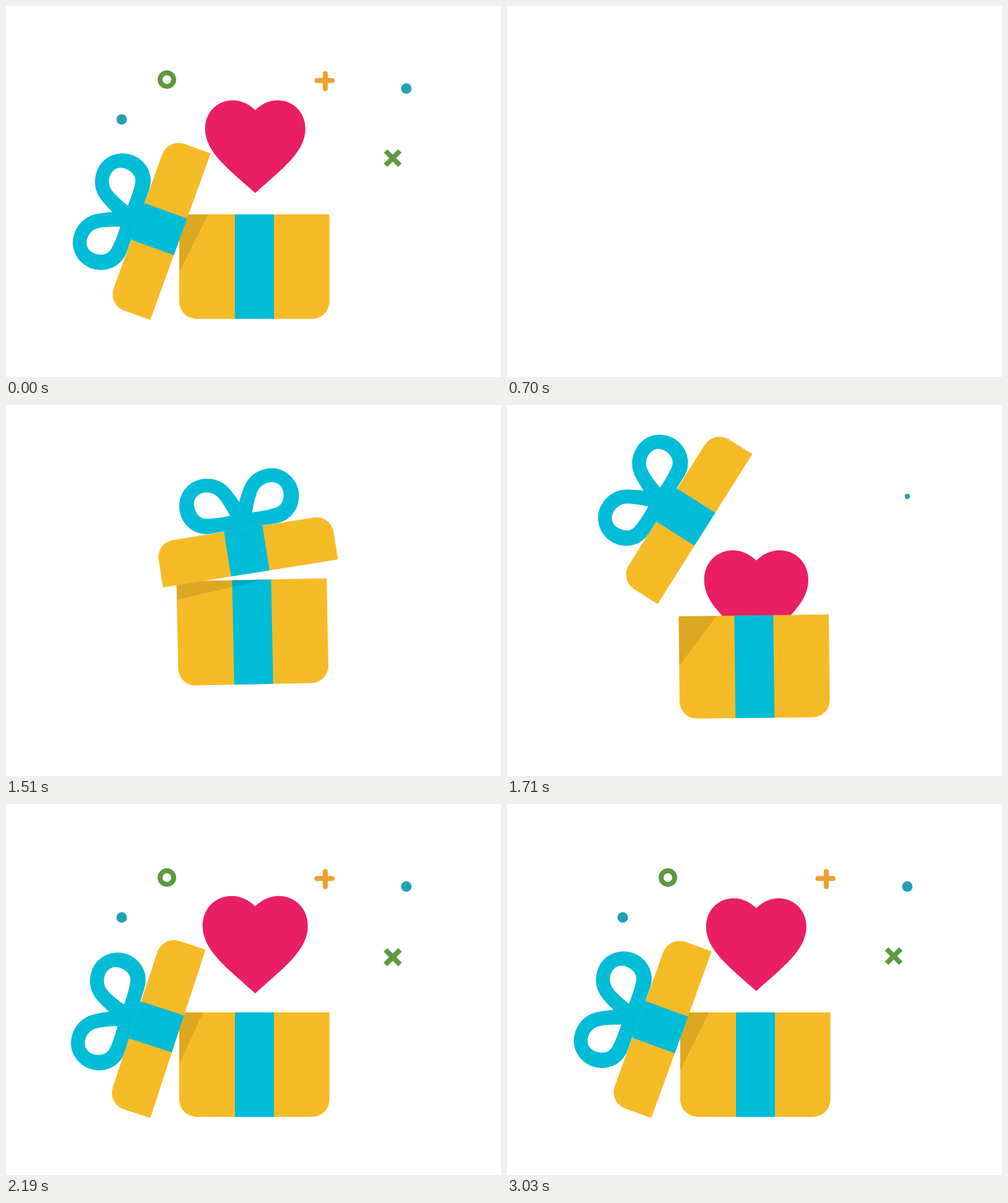
Write an HTML page with a canvas that moves like this. It is 800 px wide and 600 px high and loops after 3630 ms.

```html
<!DOCTYPE html>
<html lang="en">
<head>
<meta charset="utf-8">
<title>Gift box</title>
<style>
  html, body { margin: 0; width: 100%; height: 100%; overflow: hidden; background: #fff; }
  canvas { display: block; }
</style>
</head>
<body>
<canvas id="stage" width="800" height="600"></canvas>
<script>
const ctx = document.getElementById('stage').getContext('2d');
const LOOP = 3630, CLOSED = 1150, JUMP = 1415, LAND = 1690, OPEN = 1912;
const YELLOW = '#f5bb27', CYAN = '#00bcd7', PINK = '#ea1e63';
const GREEN = '#5f9840', ORANGE = '#efa032', TEAL = '#21a1b2';

const lidPath = new Path2D('M258.5 337V292a28 28 0 0 1 28-28H517a28 28 0 0 1 28 28V337Z');
const bodyPath = new Path2D('M280 337H522.7V478a28 28 0 0 1-28 28H308a28 28 0 0 1-28-28Z');
const loopPath = new Path2D('M402 220C394 203 388 192 381 186C372 178 361 174 348 174' +
  'A43.5 44.8 0 0 0 348 263.6H372V266H403V220Z' +
  'M384 240C378 222 371 207 366 203C354 192 330 194 329 215C329 229 336 237 345 238.5C356 240.5 372 240.5 384 240Z');
const heartPath = new Path2D('M0 -59C-10 -69 -23 -75 -36 -75C-62 -75 -81 -55 -81 -29C-81 9 -43 36 0 75' +
  'C43 36 81 9 81 -29C81 -55 62 -75 36 -75C23 -75 10 -69 0 -59Z');

const clamp = v => Math.min(1, Math.max(0, v));
const rad = deg => deg * Math.PI / 180;
const progress = (t, from, to) => clamp((t - from) / (to - from));
const bump = (t, from, to) => Math.sin(Math.PI * progress(t, from, to));
const backOut = u => 1 + 2.7 * (u - 1) ** 3 + 1.7 * (u - 1) ** 2;

// Step response of a damped spring released at rest.
function spring(time, speed, damping) {
  const a = speed * Math.max(0, time);
  return 1 - Math.exp(-damping * a) * (Math.cos(a) + damping * Math.sin(a));
}

// Slow last relaxation, from 1 to 0.
const tension = t => (1 + Math.cos(Math.PI * progress(t, 2470, 3030))) / 2;
const lidAngle = t => (70.1 + .64 * tension(t)) * spring(t - 1440, .00611, .92);

function fill(path, color) {
  ctx.fillStyle = color;
  ctx.fill(path, 'evenodd');
}

function rect(x, y, w, h, color) {
  ctx.fillStyle = color;
  ctx.fillRect(x, y, w, h);
}

function group(draw) {
  ctx.save();
  draw();
  ctx.restore();
}

function rotateAbout(x, y, deg) {
  ctx.translate(x, y);
  ctx.rotate(rad(deg));
  ctx.translate(-x, -y);
}

function dot(r, color) {
  ctx.fillStyle = color;
  ctx.beginPath();
  ctx.arc(0, 0, r, 0, 2 * Math.PI);
  ctx.fill();
}

function bar(x, y, cap, color) {
  ctx.lineWidth = 8;
  ctx.lineCap = cap;
  ctx.strokeStyle = color;
  ctx.beginPath();
  ctx.moveTo(-x, -y);
  ctx.lineTo(x, y);
  ctx.stroke();
}

const confetti = [
  { x: 647, y: 133.5, start: 1676, draw: () => dot(8.5, TEAL) },
  { x: 516, y: 121.5, start: 1742, draw() {
    bar(0, 12.3, 'round', ORANGE);
    ctx.translate(-1.2, -1);
    bar(12.3, 0, 'round', ORANGE);
  } },
  { x: 260, y: 119, start: 1806, draw(u) {
    dot(15, GREEN);
    dot(7 * progress(u, .25, .67), '#fff');
  } },
  { x: 187, y: 183.5, start: 1896, draw: () => dot(8.5, TEAL) },
  { x: 625, y: 246, start: 1968, draw() {
    bar(11.5, 11.5, 'butt', GREEN);
    bar(11.5, -11.5, 'butt', GREEN);
  } }
];

function drawConfetti(t) {
  for (const { x, y, start, draw } of confetti) {
    const u = progress(t, start, start + 260);
    if (!u) continue;
    group(() => {
      ctx.translate(x, y + 17 * (1 - u) ** 1.2);
      ctx.scale(backOut(u), backOut(u));
      draw(u);
    });
  }
}

function drawHeart(t) {
  const u = progress(t, 1540, 2010);
  if (!u) return;
  const size = (1 + .05 * tension(t)) * backOut(u);
  ctx.translate(402.8, 227.4 + 210 * (1 - u) ** 2);
  ctx.scale(size, size);
  fill(heartPath, PINK);
}

function drawBody(t) {
  const flight = progress(t, JUMP, LAND);
  const tilt = -1.15 * progress(t, JUMP, 1510) * (1 - progress(t, 1510, 2000));
  ctx.translate(401.5 + tilt, 506 - 240 * flight * (1 - flight));
  ctx.rotate(rad(tilt));
  ctx.scale(1, 1 - .12 * bump(t, CLOSED, JUMP) - .08 * bump(t, LAND, 1950));
  ctx.translate(-401.5, -506);
  fill(bodyPath, YELLOW);
  rect(370, 337, 63, 169, CYAN);

  // The lid's shadow lengthens as it opens and shrinks when it leans away.
  const angle = lidAngle(t);
  const depth = Math.min(20 + 1.07 * angle, 545 - 6.43 * angle);
  ctx.clip(bodyPath);
  ctx.fillStyle = 'rgba(0,0,0,.1)';
  ctx.beginPath();
  ctx.moveTo(280, 337);
  ctx.lineTo(280 + depth / Math.tan(rad(4 + .85 * angle)), 337);
  ctx.lineTo(280, 337 + depth);
  ctx.fill();
}

function drawLid(t) {
  const u = progress(t, JUMP, OPEN), air = u * (OPEN - JUMP);
  const dip = 169 * .12 * bump(t, CLOSED, JUMP);
  ctx.translate(-25.3 * u, dip - .628 * air + .001955 * air * air);
  rotateAbout(258.5, 337, -lidAngle(t));
  group(() => {
    rotateAbout(401.5, 264, 7 * bump(t, 1700, 2120) - 1.2 * tension(t) * progress(t, 1510, 1700));
    fill(loopPath, CYAN);
    ctx.translate(804, 0);
    ctx.scale(-1, 1);
    fill(loopPath, CYAN);
  });
  fill(lidPath, YELLOW);
  rect(370, 264, 63, 73, CYAN);
}

function render(time) {
  const t = time % LOOP;
  // The scene fades out in 50 ms steps, then the closed box fades in the same way.
  const fade = from => clamp((Math.floor((t - from) / 50) + 1) / 5);
  const alpha = t < 900 ? 1 - fade(500) : fade(900);
  const pose = t < 900 ? LOOP : CLOSED + 20 * Math.max(0, Math.floor((t - CLOSED) / 20));

  rect(0, 0, 800, 600, '#fff');
  for (const part of [drawConfetti, drawHeart, drawBody, drawLid]) group(() => part(pose));
  if (alpha < 1) rect(0, 0, 800, 600, `rgba(255,255,255,${1 - alpha})`);
}

const begin = performance.now();
function tick() {
  render(performance.now() - begin);
  requestAnimationFrame(tick);
}
tick();
</script>
</body>
</html>
```
